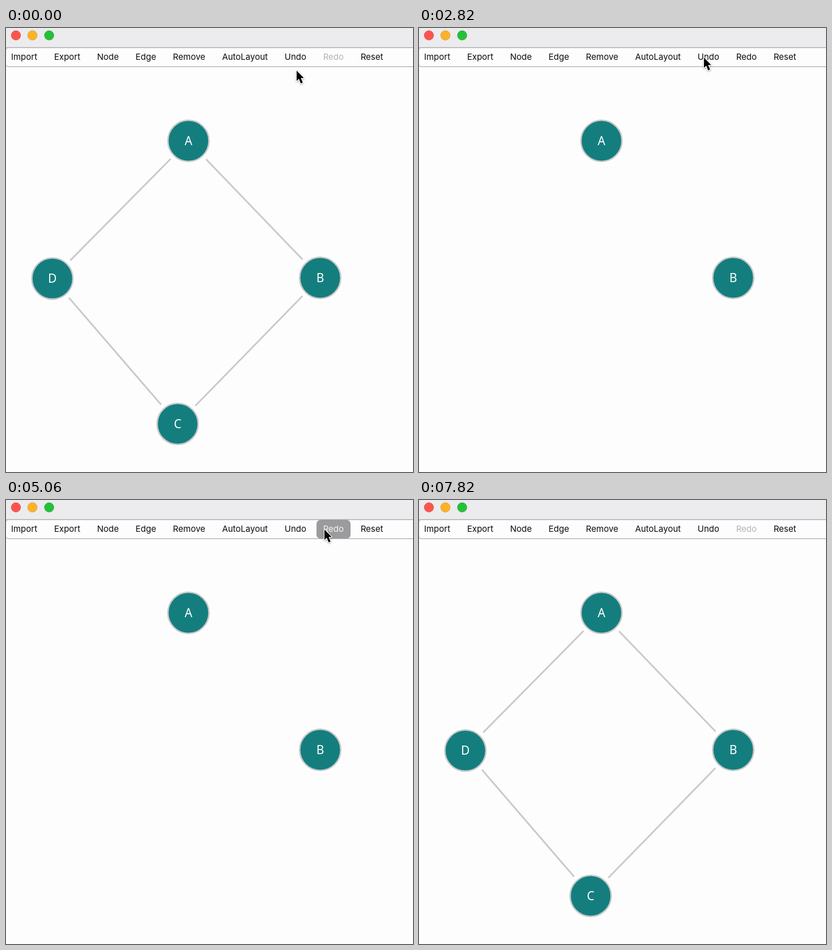
These frames come from a looping animation (717x781 px, 8.39 s). An HTML page:

```html
<!DOCTYPE html>
<html lang="en">
<head>
<meta charset="utf-8">
<title>Graph editor undo and redo</title>
<style>
  html, body { margin: 0; width: 100%; height: 100%; overflow: hidden; background: #fefdfe; }
  svg { position: absolute; left: 0; top: 0; }
  .menu {
    position: absolute; left: -2.6px; top: 35px; width: 678.5px;
    display: flex; justify-content: space-between;
    font: 15px/32.5px Inter, sans-serif; color: #0c0c0d;
  }
  .menu span { padding: 0 11.5px; border-radius: 7px; }
  .menu .off { color: #b3b2b4; }
  .menu .down { color: #f6f5f6; background: #9b9a9c; }
  .node circle { fill: #147e7e; stroke: #c9c9cb; stroke-width: 2.6; }
  .node text { font: 500 21px "Noto Sans", "Open Sans", sans-serif; fill: #fff; text-anchor: middle; }
  .edge { stroke: #cacacd; stroke-width: 3; }
  #cursor { filter: drop-shadow(0 1.5px 1.5px rgba(0, 0, 0, .35)); }
</style>
</head>
<body>
<svg width="717" height="781">
  <rect width="717" height="34" fill="#ecebed"/>
  <g stroke="#0002">
    <circle cx="17.5" cy="13" r="8.5" fill="#fd544d"/>
    <circle cx="46.5" cy="13" r="8.5" fill="#fdb225"/>
    <circle cx="76" cy="13" r="8.5" fill="#23c138"/>
  </g>
  <path d="M720 34.5H4.5Q-.5 34.5-.5 39.5V63Q-.5 68 4.5 68H720" fill="#fefdfe" stroke="#b9b8bc" stroke-width="1.3"/>
  <path d="M0 34.5H717" stroke="#a9a8ab"/>
  <g id="graph"></g>
</svg>
<div class="menu" id="menu">
  <span>Import</span><span>Export</span><span>Node</span><span>Edge</span><span>Remove</span>
  <span>AutoLayout</span><span id="undo">Undo</span><span id="redo">Redo</span><span>Reset</span>
</div>
<svg width="717" height="781">
  <path id="cursor" d="M0 1V19L4 15.3L7.4 23.5L10.8 22.1L7.4 14H12.7Z"
        stroke="#fff" stroke-width="2.4" stroke-linejoin="round" paint-order="stroke"/>
</svg>
<script>
const LOOP = 8390, HOLD = 120, NODE_GAP = 44.7;
const $ = id => document.getElementById(id);

function add(parent, tag, attrs, text = '') {
  const el = document.createElementNS('http://www.w3.org/2000/svg', tag);
  for (const key in attrs) el.setAttribute(key, attrs[key]);
  el.textContent = text;
  return parent.appendChild(el);
}

function addNode({ name, x, y }) {
  const g = add($('graph'), 'g', { class: 'node' });
  add(g, 'circle', { cx: x, cy: y, r: 36.2 });
  add(g, 'text', { x, y: y + 7.5 }, name);
  return g;
}

// A straight edge that stops short of both nodes.
function addEdge(a, b) {
  const dx = b.x - a.x, dy = b.y - a.y, k = NODE_GAP / Math.hypot(dx, dy);
  return add($('graph'), 'line', {
    class: 'edge',
    x1: a.x + dx * k, y1: a.y + dy * k,
    x2: b.x - dx * k, y2: b.y - dy * k
  });
}

const nodes = [
  { name: 'A', x: 321.4, y: 198.5 },
  { name: 'B', x: 553.5, y: 439.5 },
  { name: 'C', x: 302.4, y: 696.4 },
  { name: 'D', x: 81.7, y: 440.7 }
];

// In order of creation: undo removes from the end, redo adds back.
const parts = [
  ...nodes.map(addNode),
  ...nodes.map((n, i) => addEdge(n, nodes[(i + 1) % nodes.length]))
];

// Evenly spaced clicks, as press times.
const clicks = (first, gap, count) => Array.from({ length: count }, (_, i) => first + gap * i);
const undos = clicks(640, 380, 8);
const redos = [...clicks(4190, 400, 4), ...clicks(6150, 365, 4)];

const held = (presses, t) => presses.some(p => t >= p && t < p + HOLD);
const done = (presses, t) => presses.filter(p => t >= p + HOLD).length;

// The pointer rests between these moves and leaves the window with the last.
const origin = { x: 512, y: 74 };
const moves = [
  { from: 30, to: 600, x: 502, y: 51 },
  { from: 3610, to: 3790, x: 555, y: 54 },
  { from: 3850, to: 4050, x: 561, y: 51 },
  { from: 7700, to: 7820, x: 728, y: 0 }
];

function cursorAt(t) {
  let { x, y } = origin;
  for (const m of moves) {
    const p = Math.min(1, Math.max(0, (t - m.from) / (m.to - m.from)));
    const k = p * p * (3 - 2 * p);
    x += (m.x - x) * k;
    y += (m.y - y) * k;
  }
  return [x, y];
}

function draw(t) {
  const count = parts.length - done(undos, t) + done(redos, t);
  parts.forEach((el, i) => el.style.visibility = i < count ? 'visible' : 'hidden');

  $('undo').className = held(undos, t) ? 'down' : '';
  $('redo').className = held(redos, t) ? 'down' : count === parts.length ? 'off' : '';

  $('cursor').setAttribute('transform', `translate(${cursorAt(t)})`);
  $('cursor').style.visibility = t < moves.at(-1).to ? 'visible' : 'hidden';
}

const start = performance.now();
function tick() {
  draw((performance.now() - start) % LOOP);
  requestAnimationFrame(tick);
}
tick();
</script>
</body>
</html>
```
